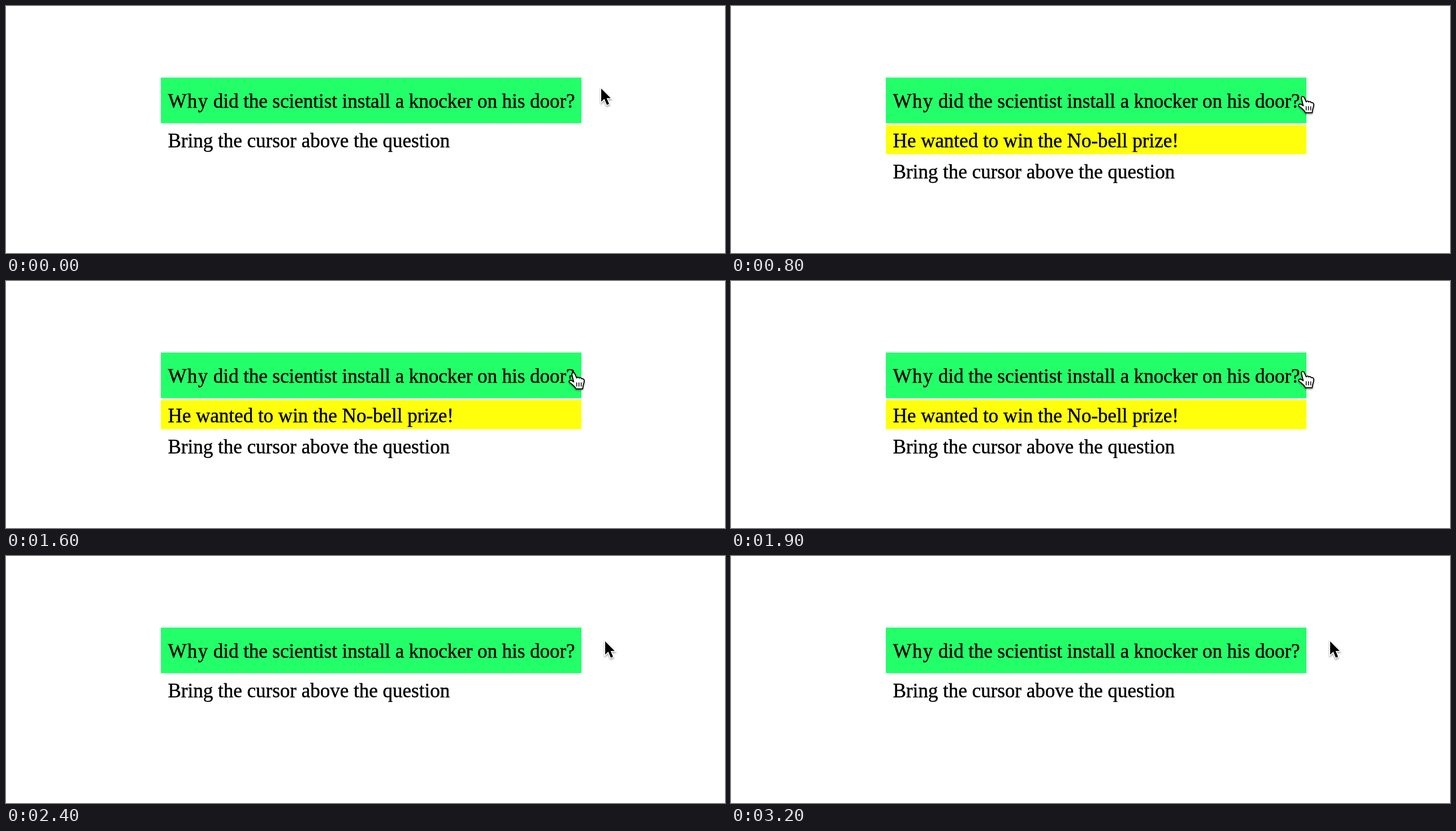
Write an HTML page that moves like this. It is 1272 by 437 pixels and loops after 3.3 s.

```html
<!DOCTYPE html>
<html lang="en">
<head>
<meta charset="utf-8">
<title>Hover joke</title>
<style>
  html, body { margin: 0; width: 100%; height: 100%; overflow: hidden; background: #fff; }
  svg { display: block; width: 100%; height: 100%; }
  text {
    font: 35px "Liberation Serif", "Times New Roman", serif;
    fill: #000; stroke: #000; stroke-width: .45px;
  }
  #question { word-spacing: -.2px; }
  #question tspan { letter-spacing: 1.2px; }
  #arrow, #hand { filter: drop-shadow(0 2px 1.5px rgba(0, 0, 0, .4)); }
</style>
</head>
<body>
<svg viewBox="0 0 1272 437">
  <rect x="274" y="126.6" width="744" height="80.8" fill="#23ff69"/>
  <text id="question" x="286.5" y="180"><tspan>Why</tspan> did the scientist install a knocker on his door?</text>
  <g id="answer">
    <rect x="274" y="210.6" width="744" height="51.6" fill="#ffff0b"/>
    <text x="286.5" y="250">He wanted to win the No-bell prize!</text>
  </g>
  <text id="hint" x="286.5" y="250">Bring the cursor above the question</text>
  <g id="cursor">
    <path id="arrow" d="M1 2V25.5L6.5 20.3 11 31 15 29.3 10.6 19H17.8Z"
      fill="#000" stroke="#fff" stroke-width="3" paint-order="stroke"/>
    <g id="hand" transform="translate(-8 -2)" stroke="#000" stroke-width="1.8" stroke-linejoin="round" stroke-linecap="round">
      <path fill="#fff" d="M6 5Q7 0 11 3.5L14.7 11.6Q17 8.5 19 11.8 22 10 23.3 13 27 12 28 16 28 20 26 25.2L25.2 30.8H13.4Q11 26 2 19.6C.2 17.4 2 14.6 5 15.8L9.4 18.6Z"/>
      <path fill="none" stroke-width="1.5" d="M14.6 20v6m4-6v6m4-6v6"/>
    </g>
  </g>
</svg>
<script>
  const LOOP = 3300, STEP = 100;
  const ENTER = 800, LEAVE = 2000;

  // pointer stops; it glides straight from one to the next
  const stops = [
    { t: 0, x: 1052, y: 144 },
    { t: 600, x: 1048, y: 145 },
    { t: ENTER - STEP, x: 1027, y: 149 },
    { t: ENTER, x: 1011, y: 160 },
    { t: 1600, x: 1003, y: 162 },
    { t: LEAVE - STEP, x: 1011, y: 160 },
    { t: LEAVE, x: 1038, y: 151 },
    { t: 2300, x: 1059, y: 149 },
    { t: LOOP, x: 1059, y: 149 }
  ];

  const $ = id => document.getElementById(id);
  const show = (id, on) => $(id).setAttribute("visibility", on ? "visible" : "hidden");
  const mix = (a, b, k) => a + (b - a) * k;

  function pointAt(t) {
    const i = stops.findIndex(s => s.t > t);
    const a = stops[i - 1], b = stops[i];
    const k = (t - a.t) / (b.t - a.t);
    return [mix(a.x, b.x, k), mix(a.y, b.y, k)];
  }

  function draw(now) {
    const t = Math.floor((now % LOOP) / STEP) * STEP;
    const over = t >= ENTER && t < LEAVE;
    show("answer", over);
    show("hand", over);
    show("arrow", !over);
    $("hint").setAttribute("y", over ? 305 : 250);
    $("cursor").setAttribute("transform", `translate(${pointAt(t)})`);
  }

  const start = performance.now();
  function tick() {
    draw(performance.now() - start);
    requestAnimationFrame(tick);
  }
  tick();
</script>
</body>
</html>
```
